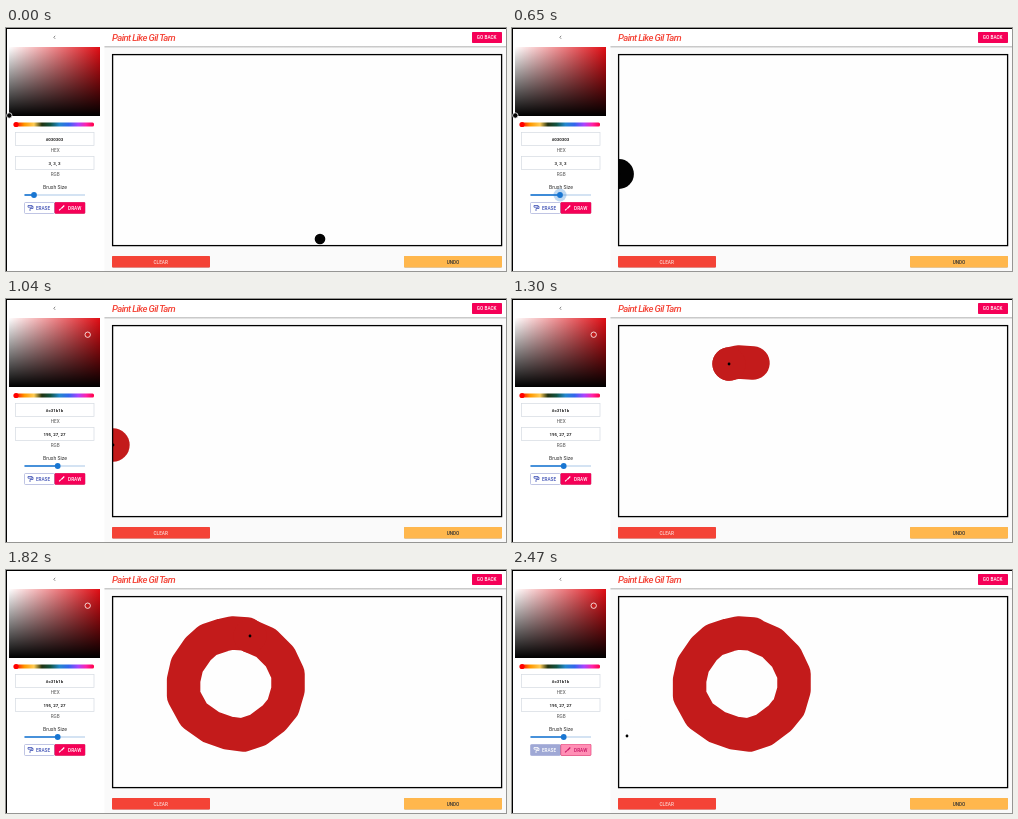
An HTML page that plays this animation: 500x243 px, repeating every 2600 ms.

```html
<!DOCTYPE html>
<html lang="en">
<head>
<meta charset="utf-8">
<title>Paint app</title>
<style>
  html, body { margin: 0; width: 100%; height: 100%; overflow: hidden; background: #fff; }
  svg { display: block; width: 500px; height: 243px; }
  text { font: 500 4.7px Roboto, sans-serif; text-anchor: middle; fill: #333; }
  .title { font: italic 500 9.5px Roboto, sans-serif; letter-spacing: -.6px; text-anchor: start; fill: #f44336; }
  .value { font-weight: 700; font-size: 4.4px; fill: #222; }
  .label { font-weight: 400; fill: #555; }
  .size { font-weight: 400; font-size: 5.1px; }
  .field { fill: #fff; stroke: #d5dbe2; stroke-width: .7; }
  .light { fill: #fff; }
  .pale { fill: #fbd5d0; }
  .tool text { fill: currentColor; }
  .raised { filter: drop-shadow(0 .6px .6px #0005); }
</style>
</head>
<body>
<svg viewBox="0 0 500 243">
  <defs>
    <linearGradient id="white"><stop stop-color="#fff"/><stop offset="1" stop-color="#fff" stop-opacity="0"/></linearGradient>
    <linearGradient id="black" x2="0" y2="1"><stop stop-opacity="0"/><stop offset="1"/></linearGradient>
    <linearGradient id="shadow" x2="0" y2="1"><stop stop-color="#bdbdbd"/><stop offset="1" stop-color="#fafafa"/></linearGradient>
    <linearGradient id="hue">
      <stop stop-color="#f00"/><stop offset=".12" stop-color="#f90"/><stop offset=".24" stop-color="#fc5"/>
      <stop offset=".34" stop-color="#231"/><stop offset=".45" stop-color="#154"/>
      <stop offset=".56" stop-color="#28c"/><stop offset=".68" stop-color="#36e"/>
      <stop offset=".8" stop-color="#a4f"/><stop offset=".9" stop-color="#f2a"/><stop offset="1" stop-color="#f04"/>
    </linearGradient>
    <clipPath id="inside"><rect x="107" y="27" width="388.5" height="190.5"/></clipPath>
  </defs>

  <rect width="500" height="243" fill="#fff"/>
  <rect x="98.5" y="18" width="402" height="225" fill="#fafafa"/>
  <rect x="98.5" y="18" width="402" height="2.5" fill="url(#shadow)"/>
  <path d="M0 .5H500M.5 0V243" stroke="#000"/>

  <!-- Header -->
  <text class="title" x="106" y="12.5">Paint Like Gil Tarn</text>
  <rect class="raised" x="466" y="4" width="30" height="11" rx="1" fill="#f50057"/>
  <text class="light" x="480.7" y="11.2">GO BACK</text>

  <!-- Canvas -->
  <rect x="106.6" y="26.6" width="389" height="191" fill="#fefefe"/>
  <g clip-path="url(#inside)">
    <path id="stroke" fill="none" stroke="#c31b1b" stroke-width="33.5" stroke-linecap="round" stroke-linejoin="round"
      d="M241 64L226 63 217 65 202 70 192 79 181 95 177.6 110 177.6 126 188 145 205 157 222 163 237 165 252 160 268 148 277 137 282 120 282 104 274 87 260 73 244 66"/>
    <g id="brush"><circle id="tip"/><circle r="1.4"/></g>
  </g>
  <rect x="106.6" y="26.6" width="389" height="191" fill="none" stroke="#000" stroke-width="1.3"/>
  <rect class="raised" x="106" y="228" width="98" height="11.5" rx="1" fill="#f44336"/>
  <text class="pale" x="154.7" y="235.7">CLEAR</text>
  <rect class="raised" x="398" y="228" width="98" height="11.5" rx="1" fill="#ffb74d"/>
  <text x="447" y="235.7">UNDO</text>

  <!-- Colour picker -->
  <path d="M49.2 7.8L47.8 9.3 49.2 10.8" fill="none" stroke="#555" stroke-width=".7"/>
  <path d="M3 19H94V88H3Z" fill="#e00d14"/>
  <path d="M3 19H94V88H3Z" fill="url(#white)"/>
  <path d="M3 19H94V88H3Z" fill="url(#black)"/>
  <circle id="picker" r="2.7" stroke="#fff" stroke-width=".8"/>
  <rect x="9" y="94.5" width="79" height="4" rx="1.5" fill="url(#hue)"/>
  <circle cx="10" cy="96.5" r="2.6" fill="#f00"/>
  <rect class="field" x="9.5" y="104.5" width="78.5" height="13"/>
  <text class="value" id="hex" x="48.5" y="112.6"/>
  <text class="label" x="49.2" y="123.7">HEX</text>
  <rect class="field" x="9.5" y="128.5" width="78.5" height="13"/>
  <text class="value" id="rgb" x="48.5" y="136.6"/>
  <text class="label" x="49.2" y="147.7">RGB</text>

  <!-- Brush size -->
  <text class="size" x="49" y="160.5">Brush Size</text>
  <path d="M18.5 167H79" stroke="#a9c7e8" stroke-width="1.2"/>
  <path id="filled" stroke="#1976d2" stroke-width="1.6"/>
  <circle id="halo" cy="167" r="6.5" fill="#1976d2" opacity=".28"/>
  <circle id="thumb" cy="167" r="2.9" fill="#1976d2"/>

  <!-- Tools -->
  <g id="erase" class="tool">
    <rect x="18.5" y="174.5" width="30" height="11" rx="1" stroke="#a5add8" stroke-width=".7"/>
    <path d="M22 177.5H26V179.2H22ZM26 178.3H27V180.5H24V183" fill="none" stroke="currentColor" stroke-width=".8"/>
    <text x="37" y="181.6">ERASE</text>
  </g>
  <g id="draw" class="tool raised">
    <rect x="48.8" y="174.2" width="30.2" height="11.3" rx="1" stroke="#f50057" stroke-width=".4"/>
    <path d="M58.3 177.5L55.3 180.5M54.8 180.7L53.1 182.3" fill="none" stroke="currentColor" stroke-width="1.1"/>
    <text x="68.7" y="181.6">DRAW</text>
  </g>
</svg>
<script>
const $ = id => document.getElementById(id);
const set = (id, attrs) => Object.entries(attrs).forEach(([k, v]) => $(id).setAttribute(k, v));

const LOOP = 2600, STEP = 130;
const sliderStops = [28, 28, 28, 32.5, 40, 48, 51.7];
const drawn = [24.2, 135, 247.6, 290, 320];   // stroke length while painting
const away = [[228, 108], [196, 144], [196, 144], [115, 166], [115, 166]];
const DRAW_START = 10, DRAW_END = 15, ERASE = 19;

function brushAt(step) {
  if (step < 2) return [314, 211];
  if (step < DRAW_START) return [107, 146];
  if (step >= DRAW_END) return away[step - DRAW_END];
  const p = $('stroke').getPointAtLength(drawn[step - DRAW_START]);
  return [p.x, p.y];
}

function paintTool(id, fill, color) {
  $(id).style.color = color;
  $(id).firstElementChild.setAttribute('fill', fill);
}

function render(step) {
  const slider = sliderStops[Math.min(step, 6)];
  set('filled', { d: `M18.5 167H${slider}` });
  set('thumb', { cx: slider });
  set('halo', { cx: slider, visibility: step > 2 && step < 7 ? 'visible' : 'hidden' });

  const [color, rgb, x, y] = step < 7 ? ['#030303', [3, 3, 3], 3.3, 87.5]
    : step < 8 ? ['#070707', [7, 7, 7], 5.5, 86.3]
    : ['#c31b1b', [195, 27, 27], 81.7, 35.7];
  $('hex').textContent = color;
  $('rgb').textContent = rgb.join(', ');
  set('picker', { cx: x, cy: y, fill: color });

  const erasing = step === ERASE;
  set('brush', { transform: `translate(${brushAt(step)})` });
  set('tip', { r: 5.3 + (slider - 28) * .48, fill: erasing ? '#fefefe' : color });

  const length = drawn[Math.min(step - DRAW_START, 4)];
  set('stroke', { 'stroke-dasharray': `${length || 0} 999`, visibility: length ? 'visible' : 'hidden' });

  paintTool('erase', erasing ? '#9fa8d5' : '#fff', erasing ? '#fff' : '#3f51b5');
  paintTool('draw', erasing ? '#ff8fb5' : '#f50057', erasing ? '#c51162' : '#fff');
}

function tick() {
  render(Math.floor(performance.now() % LOOP / STEP));
  requestAnimationFrame(tick);
}
tick();
</script>
</body>
</html>
```
